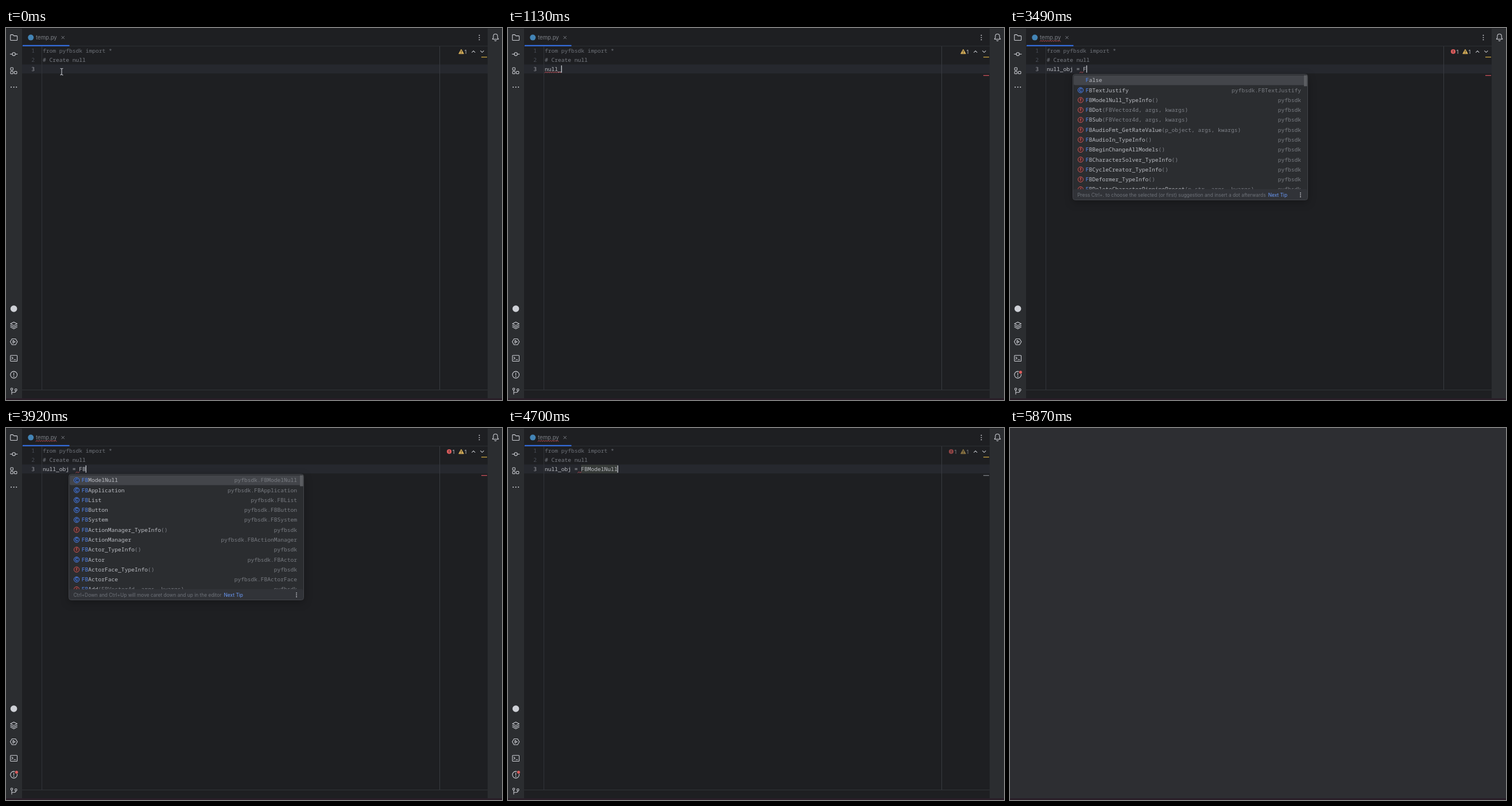
Animation, 864 px wide and 648 px high, one loop 5.92 s. Source, as an HTML page:

```html
<!DOCTYPE html>
<html lang="en">
<head>
<meta charset="utf-8">
<title>Editor typing</title>
<style>
  html, body { margin: 0; width: 100%; height: 100%; overflow: hidden; background: #1e1f22; }
  svg { display: block; width: 864px; height: 648px; }
  text { white-space: pre; }
  .code { font: 9.6px "Noto Sans Mono", monospace; }
  .ui { font: 9.6px Inter, sans-serif; }
  .tip { font: 8.4px Inter, sans-serif; }
  .line { fill: none; stroke: #ced0d6; stroke-width: 1.05; stroke-linejoin: round; stroke-linecap: round; }
</style>
</head>
<body>
<svg id="stage" viewBox="0 0 864 648"></svg>
<script>
const LOOP = 5920, CHAR = 5.76, LEFT = 64;
const stage = document.getElementById('stage');

function add(tag, attrs, parent = stage) {
  const node = document.createElementNS('http://www.w3.org/2000/svg', tag);
  for (const key in attrs) node.setAttribute(key, attrs[key]);
  parent.append(node);
  return node;
}
const group = (parent = stage) => add('g', {}, parent);
const box = (x, y, width, height, fill, parent, more) =>
  add('rect', { x, y, width, height, fill, ...more }, parent);
const dot = (cx, cy, r, fill, parent) => add('circle', { cx, cy, r, fill }, parent);
const line = (d, parent, more) => add('path', { d, class: 'line', ...more }, parent);
const ring = (cx, cy, r) => add('circle', { cx, cy, r, class: 'line' });
function label(x, y, content, fill, kind = 'code', parent, more) {
  const node = add('text', { x, y, fill, class: kind, ...more }, parent);
  node.textContent = content;
  return node;
}
function wave(x1, x2, y) {
  let d = `M${x1} ${y + 1}`;
  for (let x = x1 + 2, up = true; x <= x2 + .5; x += 2, up = !up) d += `L${x} ${up ? y - .6 : y + 1}`;
  return d;
}
const squiggle = (x1, x2, y) => line(wave(x1, x2, y), stage, { style: 'stroke:#d5545b;stroke-width:.85' });

// Window chrome
box(0, 0, 864, 648, '#1e1f22');
box(0, 0, 28, 645, '#2b2d30');
box(839, 0, 25, 645, '#2b2d30');
box(0, 0, 864, 1, '#1e1f22');
box(28, 31, 811, 1, '#2d2f33');
box(28, 63.5, 811, 15.7, '#26282e');
box(62, 32, 1, 598, '#313438');
box(755, 32, 1, 598, '#393b40');
box(28, 630, 811, 1, '#313438');
box(0, 645, 864, 3, '#291e28');
box(29, 29.7, 81.5, 2, '#3574f0');
dot(43.2, 16.6, 5, '#4384b5');
label(52, 20, 'temp.py', '#7d8087', 'ui');
line('M96.9 14.3l4.6 4.6m0-4.6l-4.6 4.6', stage, { style: 'stroke:#868a91;stroke-width:.9' });
for (const y of [12.8, 16.6, 20.4]) dot(824.5, y, .95, '#ced0d6');

// Side bars
line('M7.7 12.6q0-1 1-1h3.2l1.9 2h4.8q1 0 1 1v5.9q0 1-1 1H8.7q-1 0-1-1z');
ring(13.6, 45.4, 2.7);
line('M7.3 45.4h3.5M16.4 45.4h3.5');
for (const [x, y] of [[8, 69], [8, 75.4], [14.5, 75.4]])
  add('rect', { x, y, width: 4.4, height: 4.4, rx: 1, class: 'line' });
for (const x of [9, 13.6, 18.2]) dot(x, 103, 1, '#ced0d6');
dot(13.6, 489, 5.8, '#ced0d6');
line('M13.6 512.2l5.8 3.1-5.8 3.1-5.8-3.1zM7.8 518.2l5.8 3.1 5.8-3.1M7.8 520.9l5.8 3.1 5.8-3.1');
line('M10.5 541.4h6.2l3.1 5.2-3.1 5.2h-6.2l-3.1-5.2zM12.1 544.2v4.8l4-2.4z');
line('M8.7 570.3h9.8q1 0 1 1v8.2q0 1-1 1H8.7q-1 0-1-1v-8.2q0-1 1-1zM10 573.2l2.2 2-2.2 2M13.8 577.7h3.2');
ring(13.6, 604, 5.9);
line('M13.6 600.8v3.8', stage, { 'stroke-width': 1.3 });
dot(13.6, 606.9, .85, '#ced0d6');
ring(10, 629, 1.8);
ring(17.3, 630.2, 1.8);
line('M10 630.8v7.2M17.3 632q0 2.8-3 2.8H10');
line('M847.4 19.4h10.4l-1.5-2.3v-2.7q0-3.9-3.7-3.9t-3.7 3.9v2.7zM851 21.7q1.6 1.4 3.2 0');

// Inspection widget and stripe
const counts = group();
add('path', { d: 'M793 37.2l4.3 7.6h-8.6z', fill: '#d6ae58', stroke: '#d6ae58', 'stroke-linejoin': 'round' }, counts);
box(792.5, 39.4, 1, 2.8, '#1e1f22', counts);
box(792.5, 43, 1, 1, '#1e1f22', counts);
label(798.6, 44.6, '1', '#bcbec4', 'ui', counts);
const errorCount = group(counts);
dot(772, 41.1, 4.1, '#db5c5c', errorCount);
box(771.5, 38.7, 1, 2.9, '#1e1f22', errorCount);
box(771.5, 42.4, 1, 1, '#1e1f22', errorCount);
label(777.6, 44.6, '1', '#bcbec4', 'ui', errorCount);
line('M811.6 42.5l2.7-2.7 2.7 2.7M826.7 39.8l2.7 2.7 2.7-2.7', stage, { 'stroke-width': .95 });
box(828, 50, 10, 1.3, '#c9a43f');
const stripeRed = box(828, 82, 10, 1.3, '#c9505a');
const stripeGray = box(828, 82, 10, 1.3, '#7b7e84');

// Code
for (const [i, color] of ['#4b5059', '#4b5059', '#a1a3ab'].entries())
  label(44.2, 43.4 + i * 15.75, i + 1, color);
label(LEFT, 43.4, 'from pyfbsdk import *', '#6f737a');
label(LEFT, 59.2, '# Create null', '#7a7e85');
const usage = box(127.4, 64, 63.4, 15, '#373b39');
const typed = label(LEFT, 74.9, '', '#bcbec4');
const nameWave = squiggle(LEFT, 87, 77);
const valueWave = squiggle(121.6, 127.4, 77);
const tabWave = squiggle(52, 88, 22.3);
const alertDot = group();
dot(18.4, 599.6, 3.3, '#2b2d30', alertDot);
dot(18.4, 599.6, 2.6, '#db5c5c', alertDot);
const caret = box(0, 65.2, 1.3, 12.6, '#ced0d6');
const pointer = line('M95 70.5q2 0 2 1.2v9q0-1.2-2 1.2M99 70.5q-2 0-2 1.2M97 80.7q0 1.2 2 1.2', stage, { 'stroke-width': 1 });

// Completion popup; each item is "kind name(args)"
let clipCount = 0;
function popup(x, width, height, items, match, tip) {
  const g = group(), bottom = 80 + height, right = x + width;
  g.style.filter = 'drop-shadow(0 4px 7px rgba(0,0,0,.28))';
  box(x + .5, 80.5, width - 1, height - 1, '#2b2d30', g, { rx: 4 });
  box(x + 2, 82.4, width - (items.length > 2 ? 7.5 : 4), 17.2, '#43454a', g, { rx: 2 });
  if (items.length > 2) box(right - 7, 82.4, 5.6, 19, '#5b5d61', g);
  const id = 'clip' + clipCount++;
  box(x, 80, width, height - 19.3, '', add('clipPath', { id }, g));
  const list = add('g', { 'clip-path': `url(#${id})` }, g);
  items.forEach((item, i) => {
    const kind = item[0], [name, args] = item.slice(2).split(/(?=\()/);
    const y = 91 + i * 17.28, color = kind === 'c' ? '#548af7' : '#db5c5c';
    if (kind !== '-') {
      add('circle', { cx: x + 14, cy: y, r: 4.6, fill: kind === 'c' ? '#25324d' : '#402929',
        stroke: color, 'stroke-width': .9 }, list);
      label(x + 14, y + 2.5, kind === 'c' ? 'C' : 'f', color, '', list,
        { 'text-anchor': 'middle', style: 'font:600 7px Inter,sans-serif' });
      label(right - 12, y + 3.3, kind === 'c' ? 'pyfbsdk.' + name : 'pyfbsdk', '#7a7d83', 'code', list,
        { 'text-anchor': 'end' });
    }
    const start = name.indexOf(match);
    const row = label(x + 22.8, y + 3.3, '', '#bcbec4', 'code', list);
    const parts = [[name.slice(0, start), '#bcbec4'], [match, '#548af7'],
      [name.slice(start + match.length), '#bcbec4'], [args || '', '#7f8289']];
    for (const [part, fill] of parts) add('tspan', { fill }, row).textContent = part;
  });
  box(x + 1, bottom - 19.3, width - 2, 18.3, '#313338', g, { rx: 3 });
  const foot = label(x + 8.4, bottom - 6.2, tip, '#6f737a', 'tip', g);
  const link = add('tspan', { fill: '#6b9bfa', dx: 4 }, foot);
  link.textContent = 'Next Tip';
  for (const dy of [12.6, 9.3, 6]) dot(right - 13, bottom - dy, .9, '#ced0d6', g);
  box(x + .5, 80.5, width - 1, height - 1, 'none', g, { rx: 4, stroke: '#43454a' });
  return g;
}

const dotTip = 'Press Ctrl+. to choose the selected (or first) suggestion and insert a dot afterwards';
const caretTip = 'Ctrl+Down and Ctrl+Up will move caret down and up in the editor';
const broad = ['- False', 'c FBTextJustify', 'f FBModelNull_TypeInfo()', 'f FBDot(FBVector4d, args, kwargs)',
  'f FBSub(FBVector4d, args, kwargs)', 'f FBAudioFmt_GetRateValue(p_object, args, kwargs)',
  'f FBAudioIn_TypeInfo()', 'f FBBeginChangeAllModels()', 'f FBCharacterSolver_TypeInfo()',
  'f FBCycleCreator_TypeInfo()', 'f FBDeformer_TypeInfo()',
  'f FBDeleteCharacterPinningPreset(p_str, args, kwargs)'];
const narrow = ['c FBModelNull', 'c FBApplication', 'c FBList', 'c FBButton', 'c FBSystem',
  'f FBActionManager_TypeInfo()', 'c FBActionManager', 'f FBActor_TypeInfo()', 'c FBActor',
  'f FBActorFace_TypeInfo()', 'c FBActorFace', 'f FBAdd(FBVector4d, args, kwargs)'];
const mixed = [...narrow.slice(0, 5), ...broad.slice(5)];

// Visibility table: element, then from/to times
const spans = [
  [pointer, 0, 50], [caret, 50, LOOP],
  [popup(46, 431, 56, ['c FBModelNull', 'f FBModelNull_TypeInfo()'], 'Null', dotTip), 220, 590],
  [popup(109, 410, 220, broad, 'F', dotTip), 3330, 3760],
  [popup(109, 410, 220, mixed, 'FB', dotTip), 3760, 3870],
  [popup(109, 410, 220, narrow, 'FB', caretTip), 3870, 4260],
  [nameWave, 860, 2790], [valueWave, 2840, 5120],
  [tabWave, 2790, 4970], [alertDot, 2790, 4970],
  [errorCount, 3220, 5020], [stripeRed, 860, 4700], [stripeGray, 4700, 5500], [usage, 4700, 5500]
];
const typing = [[0, ''], [50, 'n'], [160, 'nu'], [320, 'nul'], [490, 'null'], [1130, 'null_'], [1400, 'null_o'],
  [1800, 'null_ob'], [1910, 'null_obj'], [2130, 'null_obj '], [2410, 'null_obj ='], [2510, 'null_obj = '],
  [3220, 'null_obj = F'], [3650, 'null_obj = FB'], [4260, 'null_obj = FBModelNull'],
  [5280, 'null_obj = FBModelNull()']];
const waveEnds = [[0, 87], [1130, 92], [1620, 98], [2410, 110]];
const dimming = [[0, 1], [4100, .6], [5020, 1], [5280, .6], [5340, 1]];
const fading = [[0, 0], [5770, .33], [5820, .67], [5870, 1]];
const at = (steps, t) => steps.findLast(step => step[0] <= t)[1];

const cover = box(0, 0, 864, 645, '#2d2e32');

function render(now) {
  const t = now % LOOP, text = at(typing, t);
  for (const [node, from, to] of spans) node.style.display = t >= from && t < to ? '' : 'none';
  typed.textContent = text;
  const column = text.length - (text.endsWith(')') ? 1 : 0);
  caret.setAttribute('x', LEFT + column * CHAR - .2);
  nameWave.setAttribute('d', wave(LEFT, at(waveEnds, t), 77));
  counts.style.opacity = at(dimming, t);
  cover.style.opacity = at(fading, t);
}
const origin = performance.now();
function frame() {
  render(performance.now() - origin);
  requestAnimationFrame(frame);
}
frame();
</script>
</body>
</html>
```
